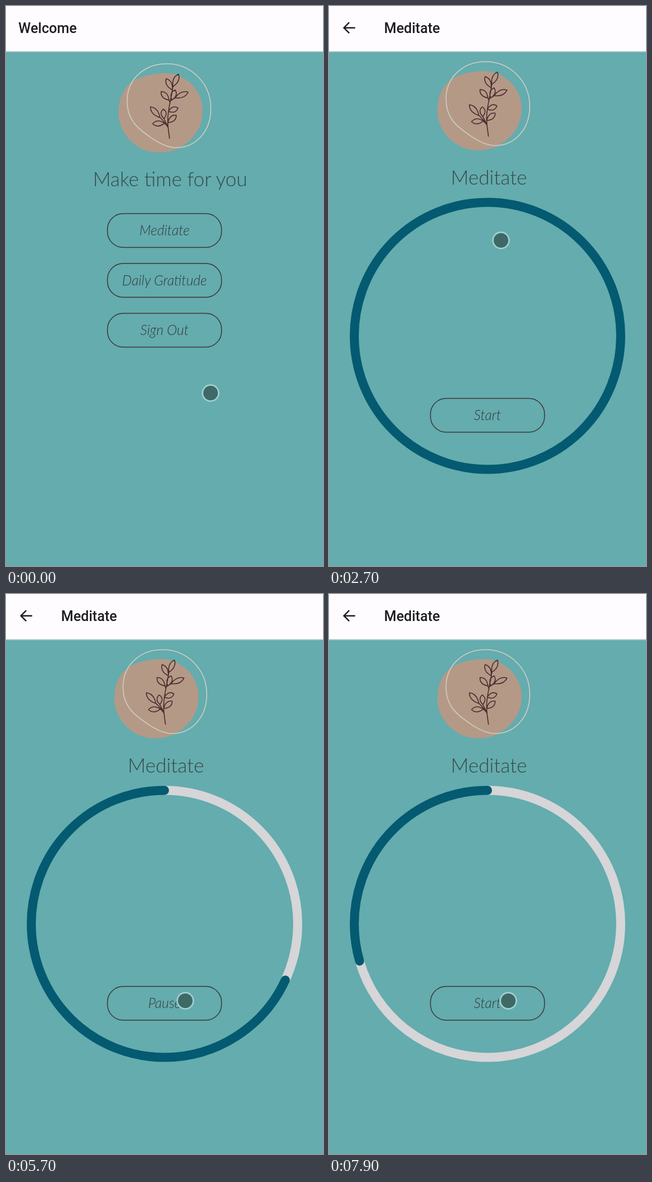
An HTML page that plays this animation: 564 by 994 pixels, repeating every 8000 ms.

```html
<!DOCTYPE html>
<html lang="en">
<head>
<meta charset="utf-8">
<title>Make time for you</title>
<style>
  html, body { margin: 0; width: 100%; height: 100%; overflow: hidden; background: #64acae; }
  svg { display: block; width: 100vw; height: 100vh; }
  .title { font: 500 25px Roboto, sans-serif; fill: #1e1d20; }
  .tag { font: 300 35px Lato, sans-serif; fill: #37484a; text-anchor: middle; }
  .btn rect { fill: none; stroke: #3d3638; stroke-width: 1.5; }
  .btn text { font: italic 300 24.5px Lato, sans-serif; fill: #343b3d; text-anchor: middle; }
  .branch { fill: none; stroke: #4a2b2c; stroke-width: 1.6; stroke-linecap: round; stroke-linejoin: round; }
  .arc { fill: none; stroke-width: 16; }
</style>
</head>
<body>
<svg viewBox="0 0 564 994">
  <defs>
    <g id="emblem">
      <path fill="#b49987" d="M283 119C318 119 350 148 350 186C350 214 335 235 313 249C300 257 287 260 271 260C232 260 200 226 200 190C200 169 206 151 220 138C236 125 258 120 283 119Z"/>
      <path fill="none" stroke="#d0cec0" stroke-width="1.6" d="M286 102.500C330 102.500 364.500 138 364.500 182C364.500 222 338 251.500 303 251.500C285 251.500 266 240 250 228C232 215 215.500 200 215.500 169C215.500 128 248 102.500 286 102.500Z"/>
      <path id="branch" class="branch"/>
    </g>
    <g id="bar">
      <rect width="564" height="994" fill="#64acae"/>
      <rect width="564" height="80.500" fill="#fefcfe"/>
      <rect y="80.500" width="564" height="1.300" fill="#b9d0d2"/>
    </g>
  </defs>

  <g id="home">
    <use href="#bar"/>
    <text class="title" x="22" y="47.500">Welcome</text>
    <use href="#emblem"/>
    <text class="tag" x="292" y="320">Make time for you</text>
  </g>

  <g id="session" opacity="0">
    <use href="#bar"/>
    <path d="M46.500 38.700H27M36 29.200L26.500 38.700L36 48.200" fill="none" stroke="#1e1d20" stroke-width="2.500"/>
    <text class="title" x="98" y="47.500">Meditate</text>
    <use href="#emblem" x="-7.300" y="-3.800"/>
    <text class="tag" x="284.500" y="317">Meditate</text>
    <g transform="translate(282 585.500) rotate(-90)">
      <circle id="spent" class="arc" r="237" pathLength="360" stroke="#d6d5d8"/>
      <circle id="left" class="arc" r="237" pathLength="360" stroke="#045a70" stroke-linecap="round"/>
    </g>
  </g>

  <g id="cursor">
    <circle r="15.700" fill="#a6d5d4" opacity=".9"/>
    <circle r="13" fill="#3a6563" opacity=".96"/>
  </g>
</svg>
<script>
const LOOP = 8000;
const $ = id => document.getElementById(id);

// Leaves: base x, base y, tip x, tip y
const leaves = [
  [297, 143, 307, 121], [296, 149, 285, 129], [295, 167, 301, 149],
  [301, 163, 324, 153], [290, 167, 276, 152], [289, 187, 306, 181],
  [274, 198, 257, 179], [281, 200, 280, 183], [282, 208, 261, 209],
  [288, 207, 303, 194]
];

function leaf([x, y, tx, ty]) {
  const dx = tx - x, dy = ty - y, k = 9 / Math.hypot(dx, dy);
  const side = s => `${x + dx * .6 - dy * k * s} ${y + dy * .6 + dx * k * s}`;
  return `M${x} ${y}Q${side(1)} ${tx} ${ty}Q${side(-1)} ${x} ${y}`;
}

$('branch').setAttribute('d',
  'M291 235C289 220 286 205 289 188C291 172 295 158 297 143' +
  'M301 163L293 168M290 167L292 172M274 198Q282 205 288 215M281 200L287 212M282 208L288 214' +
  leaves.map(leaf).join(''));

function button(page, label, y) {
  const g = document.createElementNS('http://www.w3.org/2000/svg', 'g');
  g.setAttribute('class', 'btn');
  g.innerHTML = `<rect x="180.500" y="${y}" width="203" height="60" rx="28"/>
    <text x="282" y="${y + 38.5}">${label}</text>`;
  $(page).append(g);
  return g;
}

const meditate = button('home', 'Meditate', 368.5);
button('home', 'Daily Gratitude', 457);
button('home', 'Sign Out', 545.5);
const toggle = button('session', 'Start', 696.5);
const label = toggle.querySelector('text');

const ease = p => p * p * (3 - 2 * p);

// Value of a [time, ...values] track at t
function track(steps, t, curve = p => p) {
  let i = steps.findIndex(s => s[0] > t);
  if (i < 0) return steps.at(-1).slice(1);
  if (i === 0) return steps[0].slice(1);
  const a = steps[i - 1], b = steps[i];
  const p = curve((t - a[0]) / (b[0] - a[0]));
  return a.slice(1).map((v, j) => v + (b[j + 1] - v) * p);
}

const START = 4105, STOP = 7630, SPEED = 72 / 1000;
const path = [[1300, 364, 687], [1950, 306, 416], [2750, 306, 416], [3300, 319, 722]];
const fade = [[2530, 0], [2680, 1]];
const DIM = .25;
const pressHome = [[2150, 1], [2300, DIM]];
const pressToggle = [
  [START - 170, 1], [START - 60, DIM], [START, DIM], [START + 220, 1],
  [STOP - 170, 1], [STOP - 60, DIM], [STOP, DIM], [STOP + 220, 1]
];

function draw(t) {
  const [x, y] = track(path, t, ease);
  $('cursor').setAttribute('transform', `translate(${x} ${y})`);
  $('session').setAttribute('opacity', track(fade, t)[0]);
  meditate.setAttribute('opacity', track(pressHome, t)[0]);
  toggle.setAttribute('opacity', track(pressToggle, t)[0]);
  label.textContent = t >= START && t < STOP ? 'Pause' : 'Start';

  const angle = SPEED * (Math.min(Math.max(t, START), STOP) - START);
  $('spent').setAttribute('stroke-dasharray', `${angle} 400`);
  $('left').setAttribute('stroke-dasharray', `${360 - angle} 400`);
  $('left').setAttribute('stroke-dashoffset', -angle);
}

const begin = performance.now();
function tick() {
  draw((performance.now() - begin) % LOOP);
  requestAnimationFrame(tick);
}
tick();
</script>
</body>
</html>
```
